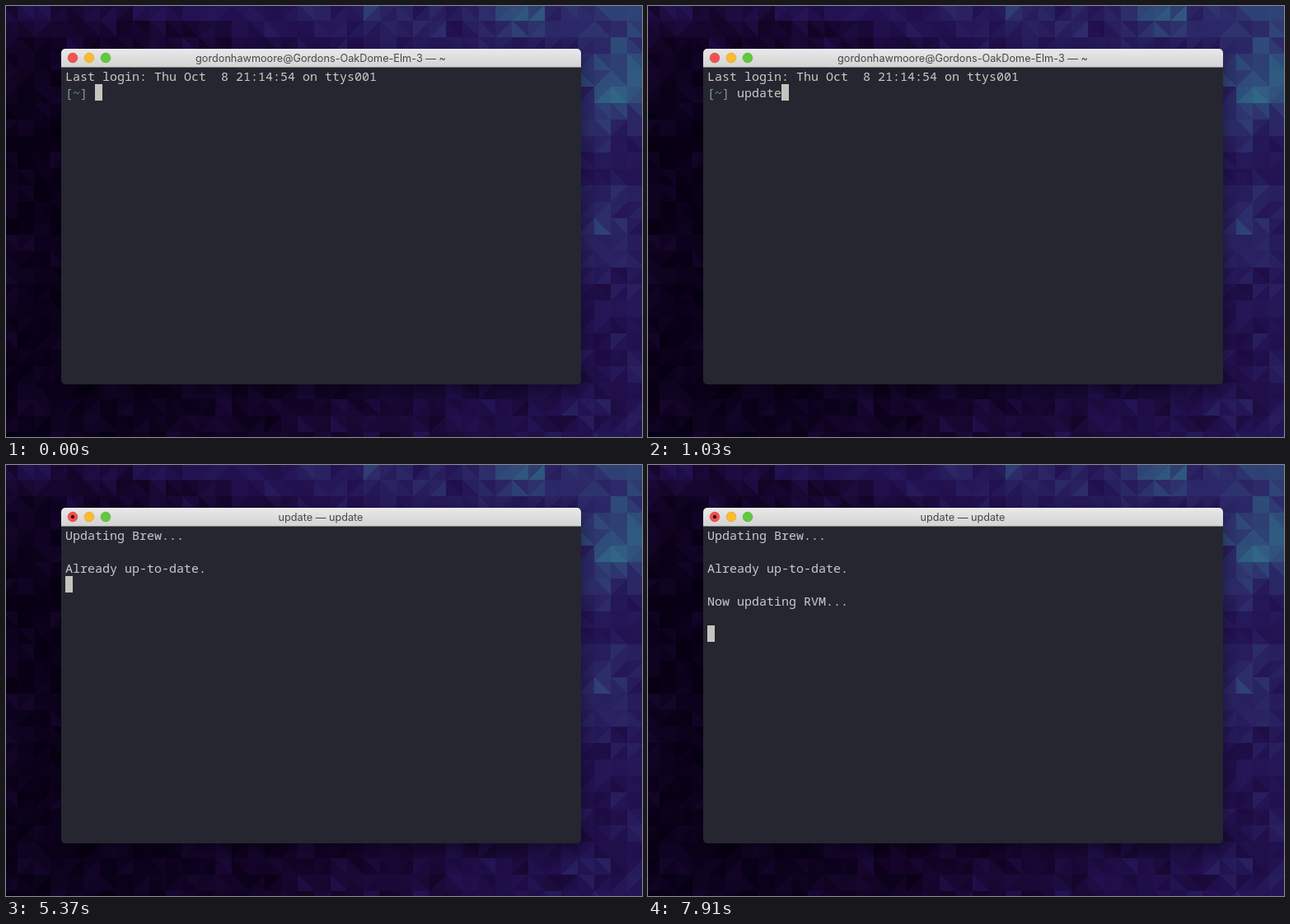
Write an HTML page that moves like this. It is 772x524 px and loops after 8000 ms.

```html
<!DOCTYPE html>
<html lang="en">
<head>
<meta charset="utf-8">
<title>Terminal update</title>
<style>
html, body { margin: 0; width: 100%; height: 100%; overflow: hidden; background: #0c031e; }
svg { display: block; width: 772px; height: 524px; }
.title { font: 12.7px Inter, "Open Sans", sans-serif; fill: #474747; text-anchor: middle; }
.term { font: 15px "Noto Sans Mono", "DejaVu Sans Mono", monospace; fill: #c9cbc8; white-space: pre; }
</style>
</head>
<body>
<svg viewBox="0 0 772 524" xmlns="http://www.w3.org/2000/svg">
  <defs>
    <linearGradient id="bar" x1="0" y1="0" x2="0" y2="1">
      <stop offset="0" stop-color="#e9e9e9"/>
      <stop offset="1" stop-color="#d3d3d3"/>
    </linearGradient>
    <filter id="blur" x="-20%" y="-20%" width="140%" height="140%">
      <feGaussianBlur stdDeviation="11"/>
    </filter>
  </defs>
  <g id="wall" shape-rendering="crispEdges"></g>
  <rect x="67" y="60" width="631" height="408" rx="5" fill="#000" opacity=".4" filter="url(#blur)"/>
  <rect x="67" y="52" width="631" height="408" rx="5" fill="#252630"/>
  <path d="M67 74.5V57a5 5 0 0 1 5-5H693a5 5 0 0 1 5 5V74.5Z" fill="url(#bar)"/>
  <g stroke-width=".6">
    <circle cx="81" cy="63" r="5.9" fill="#f0534d" stroke="#d8433d"/>
    <circle cx="101" cy="63" r="5.9" fill="#f9bb32" stroke="#dda023"/>
    <circle cx="121" cy="63" r="5.9" fill="#61c93f" stroke="#4bad2f"/>
  </g>
  <circle id="dot" cx="81" cy="63" r="2.2" fill="#3a0908"/>
  <text id="title" class="title" x="382" y="68"></text>
  <rect id="cursor" width="9" height="20" fill="#c4c5bf"/>
  <g id="lines"></g>
</svg>
<script>
const LOOP = 8000;
const CELL = 20, COL = 9, ROW = 20, LEFT = 72, TOP = 75;
const $ = id => document.getElementById(id);

// Wallpaper: brighter to the right and along the top, with a few glows
const GLOWS = [
  { x: 440, y: 12, r: 60, gain: .12 },
  { x: 622, y: 10, r: 22, gain: .28 },
  { x: 760, y: 85, r: 38, gain: .32 },
  { x: 718, y: 125, r: 35, gain: .2 },
  { x: 724, y: 268, r: 26, gain: .3 }
];
const RAMP = [[6, 0, 18], [21, 5, 43], [35, 18, 82], [45, 43, 106], [49, 102, 134]];

function level(x, y) {
  const base = .08 + .45 * (x / 772) ** 1.3 + .3 * Math.exp(-y / 60);
  return GLOWS.reduce((sum, g) =>
    sum + g.gain * Math.exp(-((x - g.x) ** 2 + (y - g.y) ** 2) / (2 * g.r ** 2)), base);
}

function shade(v) {
  const pos = Math.max(0, Math.min(.999, v)) * (RAMP.length - 1);
  const i = Math.floor(pos), k = pos - i;
  return `rgb(${RAMP[i].map((c, j) => Math.round(c + (RAMP[i + 1][j] - c) * k))})`;
}

function drawWall() {
  let seed = 41, out = "";
  const rand = () => (seed = seed * 16807 % 2147483647) / 2147483647;
  const jitter = size => (rand() - .5) * size;
  for (let y = -2; y < 524; y += CELL) {
    for (let x = -6; x < 772; x += CELL) {
      const v = level(x + CELL / 2, y + CELL / 2) + jitter(.16);
      const corners = [[x, y], [x + CELL, y], [x + CELL, y + CELL], [x, y + CELL]];
      corners.splice(Math.floor(rand() * 4), 1);
      out += `<rect x="${x}" y="${y}" width="${CELL}" height="${CELL}" fill="${shade(v)}"/>` +
        `<polygon points="${corners.join(" ")}" fill="${shade(v + jitter(.22))}"/>`;
    }
  }
  $("wall").innerHTML = out;
}

// Terminal
const COMMAND = "update";
const KEY_TIMES = [290, 440, 730, 730, 880, 1030];
const RUN = 1920, BUSY = 2070, BREW_DONE = 5370, RVM_START = 7760;
const PROMPT = '<tspan fill="#84989d">[</tspan><tspan fill="#5f93a6">~</tspan><tspan fill="#84989d">]</tspan> ';

function screen(t) {
  if (t < RUN) {
    const typed = KEY_TIMES.filter(k => t >= k).length;
    return {
      title: "gordonhawmoore@Gordons-OakDome-Elm-3 — ~",
      lines: ["Last login: Thu Oct  8 21:14:54 on ttys001", PROMPT + COMMAND.slice(0, typed)],
      col: 4 + typed, row: 1
    };
  }
  const lines = ["Updating Brew...", ""];
  if (t >= BREW_DONE) lines.push("Already up-to-date.");
  if (t >= RVM_START) lines.push("", "Now updating RVM...", "");
  return { title: "update — update", lines, col: 0, row: lines.length };
}

let shown = "";
function render(t) {
  const { title, lines, col, row } = screen(t);
  const body = lines.map((line, i) =>
    `<text class="term" x="${LEFT}" y="${TOP + 16 + i * ROW}">${line}</text>`).join("");
  $("dot").style.display = t >= BUSY ? "" : "none";
  $("cursor").setAttribute("x", LEFT + col * COL);
  $("cursor").setAttribute("y", TOP + row * ROW);
  if (title + body !== shown) {
    shown = title + body;
    $("title").textContent = title;
    $("lines").innerHTML = body;
  }
}

drawWall();
const start = performance.now();
function tick() {
  render((performance.now() - start) % LOOP);
  requestAnimationFrame(tick);
}
tick();
</script>
</body>
</html>
```
